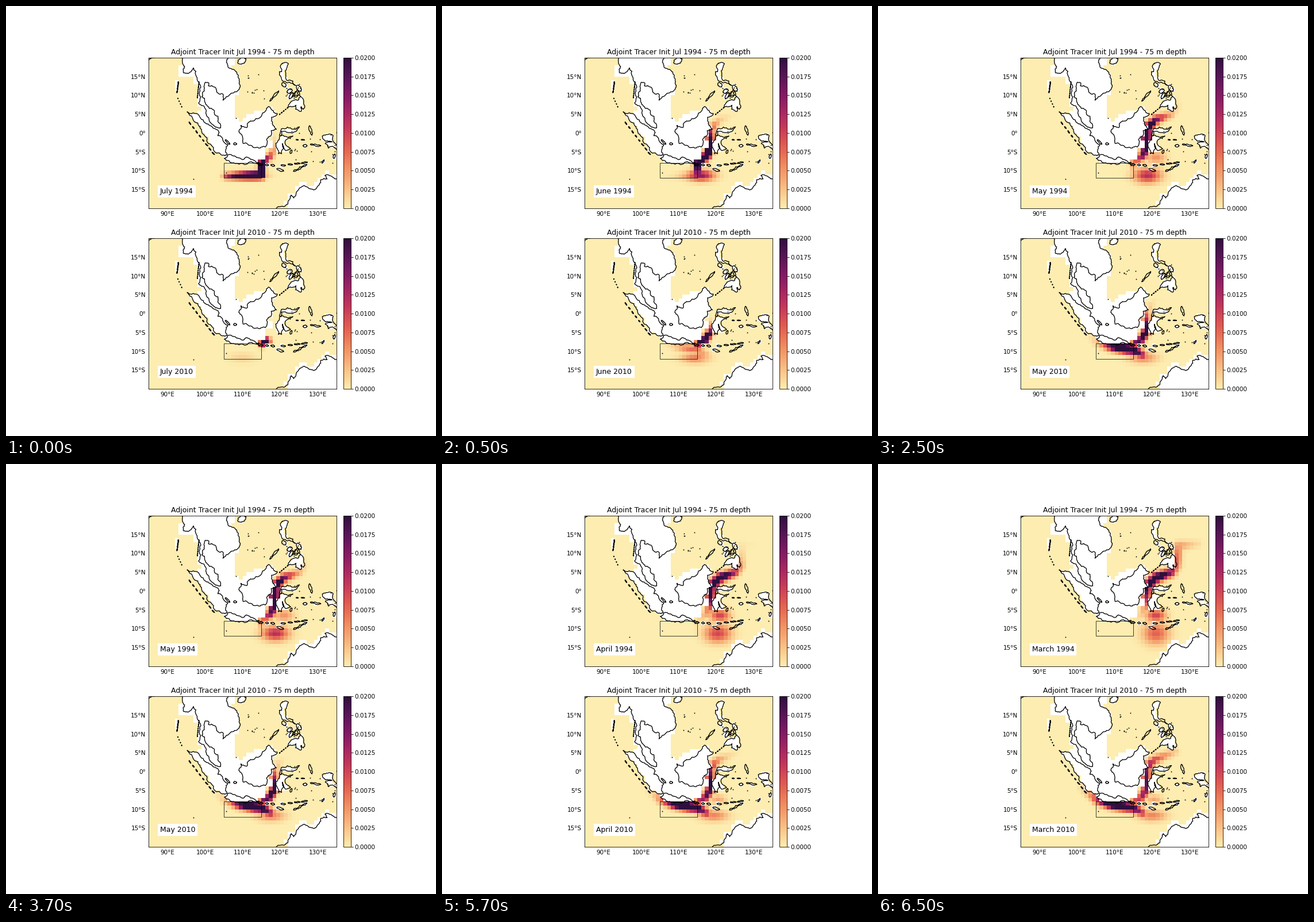
A matplotlib script that plays this animation: 748x748 px, repeating every 8000 ms.

```python
import random

import matplotlib.pyplot as plt
import numpy as np
from matplotlib.animation import FuncAnimation
from matplotlib.colors import LinearSegmentedColormap
from matplotlib.patches import Rectangle
from matplotlib.path import Path

SIZE, DPI = 748, 74.8
VMAX = 0.02
MAP_X, MAP_W, MAP_H = 248, 327, 261.8
MONTHS = ["July", "June", "May", "April", "March"]
rng = random.Random(4)

# ---- coasts: key points (lon, lat), made ragged below ----
asia = [(93.9, 20), (94.6, 17.7), (94.3, 16), (95.4, 15.8), (96.9, 17.3), (97.6, 16.4),
        (98.5, 13), (98.7, 11.2), (98.3, 8), (100.3, 6.1), (100.6, 4.3), (101.5, 2.8),
        (103.4, 1.4), (104.2, 1.4), (103.4, 3.2), (103.4, 4.5), (102.2, 6.2), (100.6, 7.2),
        (99.9, 9.2), (99.2, 9.6), (99.3, 10.6), (100, 13.4), (101, 13.3), (100.9, 12.6),
        (102.5, 12.2), (103.1, 10.9), (104.8, 10.3), (104.8, 8.7), (106.7, 10.3),
        (109.1, 11.6), (109.2, 13.6), (108.5, 15.7), (107.1, 17), (105.7, 18.8), (106.2, 20)]
sumatra = [(95.3, 5.6), (97.5, 5.2), (100, 2.7), (101.5, 1.9), (103.8, .1), (103.4, -.7),
           (104.4, -1.1), (104.9, -2.2), (106.1, -3.1), (105.9, -5.7), (104.6, -5.9),
           (102.3, -3.9), (100.5, -1.2), (99.2, .2), (98.7, 1.7), (97.1, 3.1)]
java = [(105.2, -6.8), (106, -5.9), (108.4, -6.5), (110.4, -6.95), (110.9, -6.4),
        (112.7, -7.1), (114.4, -7.8), (114.5, -8.7), (110, -8.1), (106.4, -7.35)]
borneo = [(109.6, 2), (111.2, 1.5), (111.4, 2.6), (113, 3.2), (115.3, 5.3), (116.8, 7),
          (117.7, 6.2), (119.2, 5.2), (117.7, 4.2), (118, 2.3), (119, 1), (117.6, .6),
          (117.5, -.8), (116.4, -1.7), (116.1, -3.7), (114.7, -4), (111.8, -3.3),
          (110.2, -2.8), (110.1, -1.5), (109, .3)]
sulawesi = [(125.1, 1.6), (124.2, .4), (120.3, .4), (120.1, -.8), (121.5, -.9), (123.4, -.8),
            (121.4, -2), (122.8, -4.2), (121.5, -4.7), (120.6, -2.8), (120.4, -5.5),
            (119.5, -5.5), (118.8, -2.8), (119.8, -.5), (120.3, 1.1), (123.5, 1)]
luzon = [(120.6, 18.5), (122.2, 18.4), (121.5, 15.8), (121.7, 14.1), (123.4, 13.8),
         (124.1, 12.6), (122.5, 13.5), (120.7, 13.8), (119.8, 16.3), (120.4, 16.3)]
mindanao = [(125.4, 9.8), (126.5, 7.3), (126.2, 6.3), (125.6, 7), (125.5, 5.7), (124.1, 6.3),
            (124.2, 7.4), (122.1, 6.95), (123.4, 8.6), (124.8, 8.7)]
papua = [(135, -3.3), (134.2, -2.3), (134.1, -.8), (132.4, -.4), (131.2, -.9), (132.1, -2.2),
         (133.8, -2.4), (132, -2.8), (132.8, -4), (133.6, -3.6), (135, -4.4)]
australia = [(119, -20), (121.2, -19.5), (122.2, -18), (122.9, -16.5), (123.6, -17.3),
             (124.8, -15.2), (126.5, -14), (128.2, -14.9), (129.5, -14.9), (130.8, -12.4),
             (132.5, -12.2), (131.9, -11.3), (135, -12.2)]
india = [(85, 19.3), (85.6, 19.75), (86.5, 20)]
shallow_sea = [(93, 16), (93, 15), (97, 15), (98, 12), (98, 8), (99, 6), (98, 5), (105, -7),
               (114, -8), (114, -7), (116, -7), (116, -4), (118, -4), (117, -1), (118, 4),
               (119, 6), (117, 7), (112, 5), (110, 3), (108, 4), (108, 10), (109, 11),
               (109, 16), (107, 17), (108, 20), (94, 20)]

# (lon, lat, length, width, angle) of oval islands
ovals = [(109.8, 19.2, 2.4, 1.6, 25), (118.4, 9.8, 3.6, .5, 48), (121, 12.8, 1.4, 1, -50),
         (125, 11.9, 1.9, 1.1, -55), (124.8, 10.7, 1.6, .6, -65), (122.5, 11.1, 1.5, 1.2, 40),
         (122.9, 9.9, 1.9, .7, 60), (123.7, 10.3, 1.7, .3, 60), (124.2, 9.8, .8, .5, 10),
         (120, -9.8, 1.9, .6, -18), (125.3, -9.3, 4, .7, 27), (128.1, .7, 2.6, .7, -75),
         (126.6, -3.4, 1.1, .7, 0), (129.4, -3.2, 2.8, .5, -8), (134.4, -6.2, 1.2, .5, 75),
         (131.4, -7.6, 1, .3, 55), (122.9, -5, 1, .5, 70), (106, -2.4, 1.7, .5, -45),
         (108, -2.9, .8, .6, 0)]


def ragged(points, closed=True):
    """Midpoint displacement turns a few key points into a rough coast."""
    pts = list(points) + points[:1] * closed
    for _ in range(3):
        out = pts[:1]
        for (x0, y0), (x1, y1) in zip(pts, pts[1:]):
            k = rng.uniform(-.2, .2)
            out += [((x0 + x1) / 2 - k * (y1 - y0), (y0 + y1) / 2 + k * (x1 - x0)), (x1, y1)]
        pts = out
    return np.array(pts)


def oval(x, y, length, width, angle):
    t = np.linspace(0, 2 * np.pi, 8, endpoint=False)
    z = (length * np.cos(t) + 1j * width * np.sin(t)) / 2 * np.exp(1j * np.radians(angle))
    return ragged([(x + p.real, y + p.imag) for p in z])


def chain(start, end, count, length, width):
    """Islands strung out along a line."""
    (x0, y0), (x1, y1) = start, end
    angle = np.degrees(np.arctan2(y1 - y0, x1 - x0))
    for t in np.linspace(0, 1, count):
        yield oval(x0 + t * (x1 - x0), y0 + t * (y1 - y0),
                   length * rng.uniform(.6, 1.1), width, angle + rng.uniform(-12, 12))


mainland = ragged(asia, closed=False)
north_coast = ragged(australia, closed=False)
islands = [ragged(c) for c in (sumatra, java, borneo, sulawesi, luzon, mindanao)]
islands += [oval(*o) for o in ovals]
islands += chain((115, -8.4), (118, -8.6), 3, 1.2, .5)
islands += chain((120.8, -8.6), (126.4, -7.9), 4, 1.6, .35)
small_chains = [*chain((96, 2.6), (102.2, -5.4), 8, .8, .2),
                *chain((92.9, 13.3), (92.6, 11), 4, .7, .2),
                *chain((92.8, 9.2), (93.8, 7), 4, .2, .1),
                *chain((98.4, 13.5), (98, 9.5), 9, .3, .15),
                *chain((122, 6.7), (119.9, 5), 5, .3, .15),
                *chain((124.5, -1.8), (126, -1.8), 2, .9, .2)]
papua_coast = ragged(papua, closed=False)
coasts = [mainland, north_coast, papua_coast, ragged(india, False), *islands, *small_chains]


def scatter(count, west, south, east, north):
    return [(rng.uniform(west, east), rng.uniform(south, north)) for _ in range(count)]


islets = [(105.6, -10.5), (96.9, -12.2), (108.2, 3.9)]
islets += scatter(12, 111, 8, 116, 17) + scatter(24, 122, -8, 135, 2)
islets += scatter(14, 121, 9, 126, 13)

# ---- model grid: white cells are land or shallow sea ----
lon, lat = np.meshgrid(np.arange(85.5, 135), np.arange(-19.5, 20))
centres = np.column_stack([lon.ravel(), lat.ravel()])


def inside(polygon):
    return Path(polygon).contains_points(centres).reshape(lon.shape)


south_east_shelf = np.vstack([north_coast + (-.4, .9), [(136, -11), (136, -21)]])
land = np.any([inside(p) for p in (mainland, shallow_sea, papua_coast, south_east_shelf,
                                   *islands)], axis=0)
land |= (abs(lon - 92.5) < .6) & (abs(lat - 12.5) < 1.6)


# ---- tracer, month = 0 (July) to 4 (March) ----
def smooth(t):
    t = np.clip(t, 0, 1)
    return t * t * (3 - 2 * t)


def ease(month, start, end):
    """Slows down towards the last month."""
    return end + (start - end) * (1 - month / 4) ** 2


def along(route):
    """Each cell's position along a route and its distance from it."""
    position, nearest, travelled = np.zeros(lon.shape), np.full(lon.shape, np.inf), 0
    for (x0, y0), (x1, y1) in zip(route, route[1:]):
        dx, dy = x1 - x0, y1 - y0
        length = np.hypot(dx, dy)
        t = np.clip(((lon - x0) * dx + (lat - y0) * dy) / length ** 2, 0, 1)
        dist = np.hypot(lon - x0 - t * dx, lat - y0 - t * dy)
        closer = dist < nearest
        position[closer] = (travelled + t * length)[closer]
        nearest = np.minimum(nearest, dist)
        travelled += length
    return position, nearest


def pulse(route, centre, length, width, strength):
    position, dist = route
    return strength * np.exp(-((position - centre) / length) ** 2 - (dist / width) ** 2)


def cloud(x, y, rx, ry, strength):
    return strength * np.exp(-((lon - x) / rx) ** 2 - ((lat - y) / ry) ** 2)


to_pacific = along([(105.5, -11.5), (115, -11.3), (115, -8), (117.5, -6), (118.5, -4),
                    (118.5, 1), (121, 3.5), (125, 5), (126.5, 7), (127, 12), (132, 12.5)])
up_strait = along([(114.5, -9.5), (115.5, -7.6), (117, -7), (118.4, -5), (118.5, 1),
                   (120.5, 3), (126, 5.3)])
along_java = along([(117.5, -11), (115, -9.6), (109.5, -8.8), (105.5, -7.6), (101.5, -4.5)])


def tracer_1994(m):
    return [pulse(to_pacific, ease(m, 8, 26), 6.5, .85 + .08 * m, 2.2 * np.exp(-.12 * m)),
            pulse(to_pacific, 8 + 6.5 * m, 7, 1.1, .4),
            cloud(ease(m, 112, 121), -11.3, 3.3, .9 + .45 * m, .9 * np.exp(-.2 * m)),
            cloud(121, -6.5, 2.4, 1.6, .5 * smooth((m - 1) / 2))]


def tracer_2010(m):
    return [pulse(up_strait, 2.5 + 1.6 * m, 1.2 + 1.8 * m, .8 + .06 * m, 2 * np.exp(-.2 * m)),
            pulse(along_java, 3.4 + .8 * m, 3.6 + .7 * m, 1.1,
                  (1.9 - .1 * m) * smooth((m - .6) / 1.4)),
            cloud(ease(m, 110, 120), -11.7, 3.5, 1.4, .3 * min(1, m + .25)),
            cloud(120.5, -7.5, 2, 1.2, .2 * smooth(m - 2))]


def monthly_fields(tracer):
    return [np.ma.masked_where(land, VMAX * np.max(tracer(m), axis=0)) for m in range(5)]


# ---- figure ----
matter = LinearSegmentedColormap.from_list("matter", [
    "#fdedb0", "#facd91", "#f6ad77", "#f08e62", "#e76d54", "#d85053",
    "#c3385a", "#a82860", "#8a1d63", "#6b185d", "#4c1550", "#2f0f3d"])
fig = plt.figure(figsize=(SIZE / DPI, SIZE / DPI), dpi=DPI, facecolor="white")


def add_axes(x, bottom, w, h):
    return fig.add_axes([x / SIZE, bottom / SIZE, w / SIZE, h / SIZE])


def degrees(values, positive, negative):
    return [f"{abs(d)}°" + (positive if d > 0 else negative if d < 0 else "") for d in values]


def add_panel(year, fields, bottom):
    ax = add_axes(MAP_X, bottom, MAP_W, MAP_H)
    mesh = ax.pcolormesh(np.arange(85, 136), np.arange(-20, 21), fields[0],
                         cmap=matter, vmin=0, vmax=VMAX)
    for coast in coasts:
        ax.plot(*coast.T, color="black", lw=1.25)
    ax.plot(*np.array(islets).T, "k.", ms=1.6)
    ax.add_patch(Rectangle((105, -12), 10, 4, fill=False, lw=.7, zorder=4))
    ax.set(xlim=(85, 135), ylim=(-20, 20))
    lons, lats = range(90, 131, 10), range(-15, 16, 5)
    ax.set_xticks(lons, degrees(lons, "E", "W"))
    ax.set_yticks(lats, degrees(lats, "N", "S"))
    ax.tick_params(length=0, pad=5)
    ax.set_title(f"Adjoint Tracer Init Jul {year} - 75 m depth", fontsize=12)
    label = ax.text(88, -16, "", fontsize=12, zorder=5,
                    bbox=dict(facecolor="white", edgecolor="none"))
    cax = add_axes(586.5, bottom, MAP_H / 20, MAP_H)
    fig.colorbar(mesh, cax=cax, ticks=np.linspace(0, VMAX, 9), format="%.4f")
    return year, fields, mesh, label


panels = [add_panel(1994, monthly_fields(tracer_1994), 396.2),
          add_panel(2010, monthly_fields(tracer_2010), 82)]


def update(frame):
    month = (frame + 3) // 4  # half-second frames, a new month every two seconds
    for year, fields, mesh, label in panels:
        mesh.set_array(fields[month])
        label.set_text(f"{MONTHS[month]} {year}")


anim = FuncAnimation(fig, update, frames=16, interval=500, repeat=True, repeat_delay=0)
plt.show()
```
